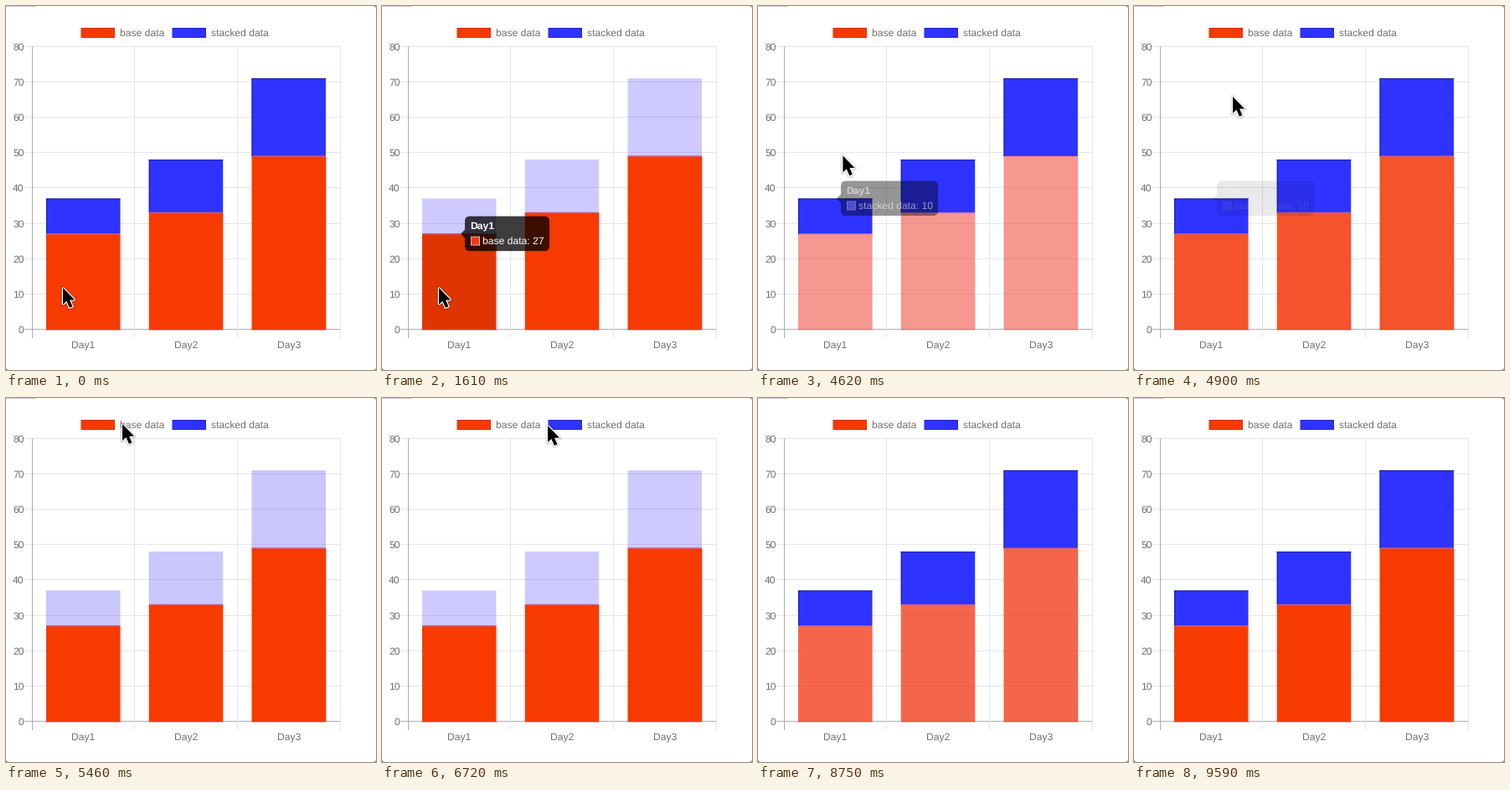
A matplotlib script for the animation above (9940 ms loop, 442x434 px).

```python
import numpy as np
import matplotlib.pyplot as plt
from matplotlib.animation import FuncAnimation
from matplotlib.patches import FancyBboxPatch, Polygon, Rectangle

W, H, DPI = 442, 434, 64
STEP, FRAMES = 70, 142
plt.rcParams["font.family"] = "Liberation Sans"
plt.rcParams["text.hinting"] = "none"

BASE, STACK = (27, 33, 49), (10, 15, 22)
ZERO, UNIT = 385, 337 / 80
SLOT, BAR_W = 122.75, 88.5


def rgb(*c):
    return np.array(c) / 255


RED, PINK = rgb(246, 58, 0), rgb(238, 102, 115)
BLUE, LILAC = rgb(46, 51, 255), rgb(95, 82, 255)

# start, duration and the series being pointed at
HOVERS = ((0, 400, "base"), (2690, 400, "stack"), (4480, 1000, None),
          (5180, 500, "base"), (6725, 400, "stack"), (8470, 900, None))
SWITCH, LEAVE, GONE = 2690, 4480, 8540

# start, end and goal of each pointer move
HOME = (67, 334)
MOVES = ((2590, 2870, (82, 265)), (3080, 3290, (85, 242)),
         (4360, 4900, (117, 106)), (4900, 5250, (138, 29)),
         (6230, 6720, (197, 31)), (6720, 7070, (238, 28)))
ARROW = 0.88 * np.array([(0, 0), (0, 22.5), (5, 18), (9, 27), (13, 25.3),
                         (9.2, 16.6), (16, 16.4)])

fig = plt.figure(figsize=(W / DPI, H / DPI), dpi=DPI, facecolor="white")
ax = fig.add_axes([0, 0, 1, 1])
ax.set_xlim(0, W)
ax.set_ylim(H, 0)
ax.axis("off")


def px(n):
    return n * 72 / DPI


def rect(x, y, w, h, color, z=1):
    return ax.add_patch(Rectangle((x, y), w, h, facecolor=color, lw=0,
                                  zorder=z, snap=False))


def label(x, y, s, ha="left", color=rgb(112, 112, 112), z=5, weight="normal"):
    return ax.text(x, y, s, fontsize=px(12.1), ha=ha, va="baseline",
                   color=color, zorder=z, weight=weight)


def shape(points, z, color="black", **style):
    return ax.add_patch(Polygon(points, facecolor=color, edgecolor=color,
                                zorder=z, **style))


def level(value):
    return ZERO + 0.4 - value * UNIT


def ramp(t, start, length):
    return min(max((t - start) / length, 0), 1)


def ease(t, start, length):
    return 1 - (1 - ramp(t, start, length)) ** 4


def draw_axes():
    grid, axis = rgb(229, 229, 229), rgb(172, 172, 172)
    for v in range(0, 81, 10):
        y = round(ZERO - v * UNIT)
        rect(22, y, 377, 1, grid if v else axis)
        label(21.6, y + 4.5, str(v), "right")
    for k in range(4):
        rect(int(31 + k * SLOT), 48, 1, 348, grid if k else axis)
    for k in range(3):
        label(92.3 + k * SLOT, 407.5, f"Day{k + 1}", "center")


def draw_legend():
    for x, color, name in ((89.5, RED, "base data"), (198.5, BLUE, "stacked data")):
        rect(x, 26, 40.5, 12, color * 0.8)
        rect(x + 0.7, 26.7, 39.3, 10.8, color, 2)
        label(x + 46.5, 36.3, name)


def draw_bars():
    reds, blues, red_edges, blue_edges = [], [], [], []
    rose, navy = rgb(205, 90, 130), rgb(28, 30, 150)
    shadow = rgb(212, 180, 186)
    for k, (b, s) in enumerate(zip(BASE, STACK)):
        x, mid, top = 48 + k * SLOT, level(b), level(b + s)
        reds.append(rect(x, mid, BAR_W, ZERO + 1 - mid, RED, 2))
        blues.append(rect(x, top, BAR_W, mid - top, BLUE, 2))
        red_edges += [rect(x, mid - 0.6, BAR_W, 1.4, rose, 3),
                      rect(x + BAR_W, mid + 1, 1, ZERO + 1 - mid, shadow, 3),
                      rect(x, ZERO + 1, BAR_W + 1, 1, shadow, 3)]
        blue_edges += [rect(x, top, BAR_W, 1, navy, 3),
                       rect(x, top, 1, mid - top, navy, 3)]
    return (reds, red_edges), (blues, blue_edges)


draw_axes()
draw_legend()
rect(0, 0, 35, 1, rgb(196, 199, 216))
for corner in ((440, 0), (0, 432.5), (440.5, 432.5)):
    rect(*corner, 1.5, 1.5, rgb(120, 125, 140))
red_bars, blue_bars = draw_bars()

bubble = ax.add_patch(FancyBboxPatch(
    (99, 209), 116, 41, facecolor="black", lw=0, zorder=6,
    boxstyle="round,pad=0,rounding_size=6"))
caret = shape([(0, 0)] * 3, 6, lw=0)
key_rim = rect(106, 0, 11, 11, rgb(185, 185, 215), 7)
key_fill = rect(107, 0, 9, 9, BLUE, 8)
title = label(105, 0, "Day1", color="white", z=7, weight="bold")
body = label(119.5, 0, "", color="white", z=7)

shadows = [shape(ARROW, 9, alpha=0.07, lw=px(w), joinstyle="round")
           for w in (2, 4, 6)]
rim = shape(ARROW, 10, "white", lw=px(2.4), joinstyle="miter")
arrow = shape(ARROW, 11, lw=0)


def paint(series, full, faint, fade, dark):
    bars, edges = series
    fill = full + (faint - full) * fade ** 0.7
    for k, bar in enumerate(bars):
        bar.set_facecolor(fill if k else fill * (1 - dark))
        bar.set_alpha(1 - 0.7 * fade)
    for edge in edges:
        edge.set_alpha(1 - fade)


def place_tooltip(t, show):
    k = ease(t, SWITCH, 300)
    cy = level(27 + 10 * k)
    bubble.set_bounds(99, cy - 21, 101 + 15 * k, 41.5)
    caret.set_xy([(94, cy), (99, cy - 5), (99, cy + 5)])
    for part, dy in ((key_rim, 3), (key_fill, 4), (title, -5.8), (body, 12.2)):
        part.set_y(cy + dy)
        part.set_alpha(show)
    for part in (bubble, caret):
        part.set_alpha(0.76 * show)
    first = t < SWITCH
    body.set_text("base data: 27" if first else "stacked data: 10")
    key_fill.set_facecolor(RED if first else BLUE * 0.95)


def place_pointer(t):
    tip = np.array(HOME, float)
    for start, end, goal in MOVES:
        tip += (np.array(goal) - tip) * ramp(t, start, end - start)
    for part in shadows:
        part.set_xy(ARROW + tip + (1, 2.5))
    for part in (rim, arrow):
        part.set_xy(ARROW + tip + (1, 2))
    for part in (*shadows, rim, arrow):
        part.set_visible(t < GONE)


def draw(i):
    t = i * STEP
    red = blue = show = 0
    for start, length, target in HOVERS:
        e = ease(t, start, length)
        red += ((target == "stack") - red) * e
        blue += ((target == "base") - blue) * e
        if start <= LEAVE:
            show += ((target is not None) - show) * e
    dark = 0.09 * show if t < LEAVE else 0
    paint(red_bars, RED, PINK, red, dark if t < SWITCH else 0)
    paint(blue_bars, BLUE, LILAC, blue, dark if t >= SWITCH else 0)
    place_tooltip(t, show)
    place_pointer(t)
    return []


anim = FuncAnimation(fig, draw, frames=FRAMES, interval=STEP, repeat=True,
                     repeat_delay=0, init_func=lambda: draw(0), blit=False)
plt.show()
```
